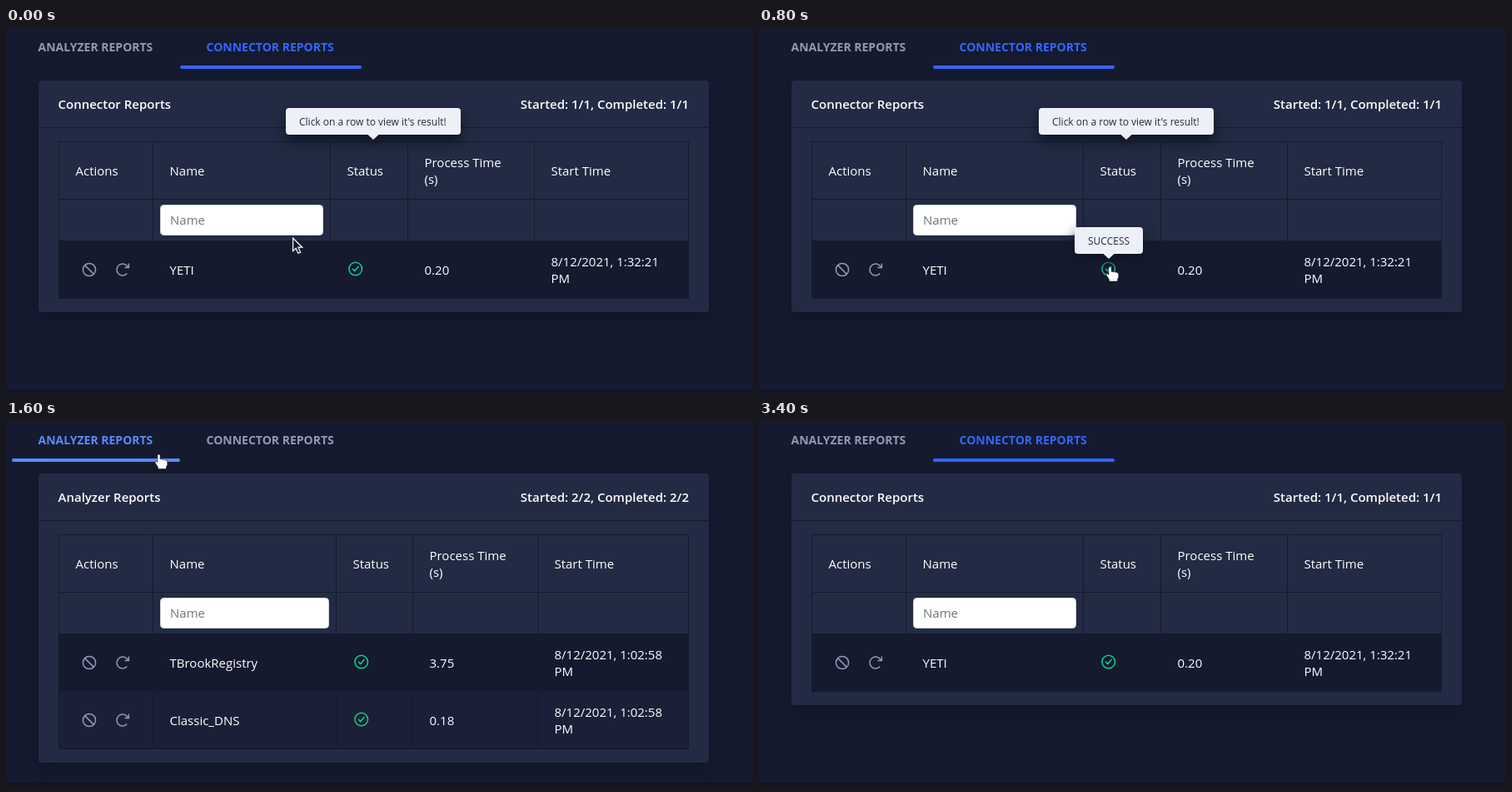
An HTML page for the animation above (3.6 s loop, 897 px wide and 438 px high).

```html
<!DOCTYPE html>
<html lang="en">
<head>
<meta charset="utf-8">
<title>Reports</title>
<style>
html, body { margin: 0; width: 100%; height: 100%; overflow: hidden; background: #151a2f; }
svg { display: block; width: 897px; height: 438px; }
text { font: 15px "Open Sans", "Noto Sans", sans-serif; fill: #fff; }
.title { font-weight: 600; }
.tab text { font-size: 14px; font-weight: 700; fill: currentColor; }
.tab rect { fill: currentColor; }
.card, .tip { filter: drop-shadow(0 8px 8px #101426); }
.card { fill: #222b43; }
.tip { fill: #edf1f7; }
.tip text { font-size: 12px; fill: #222b45; }
.hint { fill: #6c757d; }
.grid { stroke: #151a2f; fill: none; shape-rendering: crispEdges; }
.icon { stroke: #8f9bb3; stroke-width: 1.5; fill: none; }
.done { stroke: #10cc8c; stroke-width: 1.6; fill: none; stroke-linecap: round; stroke-linejoin: round; }
</style>
</head>
<body>
<svg viewBox="0 0 897 438">
  <defs>
    <g id="ban" class="icon"><circle r="7.6"/><path d="M-5.4-5.4 5.4 5.4"/></g>
    <g id="redo" class="icon">
      <path d="M5.3 4.6A7 7 0 1 1 5.6-4.2L7-2.5M7.4-7.5V-2.5H2.4"/>
    </g>
    <g id="done" class="done"><circle r="7.8"/><path d="M-3.2.2-.9 2.6 3.3-2.6"/></g>
  </defs>
  <rect y="434" width="897" height="4" fill="#101426"/>
  <g class="tab" id="tabA"><text x="38.5" y="28">ANALYZER REPORTS</text><rect x="7" y="45" width="202" height="4" rx="2"/></g>
  <g class="tab" id="tabC"><text x="240.5" y="28">CONNECTOR REPORTS</text><rect x="209" y="45" width="218" height="4" rx="2"/></g>
  <g id="viewA"></g>
  <g id="viewC"></g>
  <g class="tip" id="rowTip">
    <rect x="336" y="96" width="210" height="32" rx="4"/><path d="M434 127.5h14l-7 6.5z"/>
    <text x="352" y="117">Click on a row to view it's result!</text>
  </g>
  <g class="tip" id="statusTip">
    <rect x="379" y="239" width="82" height="32" rx="4"/><path d="M413 270.5h14l-7 6.5z"/>
    <text x="395" y="260">SUCCESS</text>
  </g>
  <g id="cursor">
    <path id="arrow" d="M.6.6V16.2L4.2 12.8 6.8 18.8 9.6 17.6 7 11.7H11.8Z" fill="#151a2f" stroke="#fff" stroke-width="1.2"/>
    <path id="hand" d="M-1.6 1.8Q0-1 1.6 1.8V6.2L8 7.2Q10.3 7.8 10.3 10V13L9 15.5V18H-1V16L-4.4 10.6Q-5 8.6-3.4 8.6L-1.6 10.2Z" fill="#fff" stroke="#151a2f" stroke-width=".6"/>
  </g>
</svg>
<script>
const LOOP = 3600, STEP = 100;
const $ = id => document.getElementById(id);
const text = (x, y, s, attrs = '') => `<text x="${x}" y="${y}" ${attrs}>${s}</text>`;
const use = (id, x, y) => `<use href="#${id}" x="${x}" y="${y}"/>`;

function table(title, count, cols, rows) {
  const bottom = 255 + 69 * rows.length;
  const [, name, status, process, start] = cols;
  const at = i => cols[i] + 20.5;
  let out = `<rect class="card" x="39" y="63" width="805" height="${bottom + 17 - 63}" rx="4"/>`
    + text(62.5, 97, title, 'class="title"')
    + text(820, 97, `Started: ${count}, Completed: ${count}`, 'class="title" text-anchor="end"');

  rows.forEach((row, i) => {
    out += `<rect x="63" y="${255 + 69 * i}" width="757" height="69" fill="${i % 2 ? '#1b1f37' : '#151a2f'}"/>`;
  });
  const across = [136, 205, 255, bottom].map(y => `M63 ${y + .5}H820`).join('');
  const down = [...cols, 819].map(x => `M${x + .5} 136V${bottom + 1}`).join('');
  out += `<path class="grid" d="M39 119.5H844${across}${down}"/>`;

  out += text(at(0), 177, 'Actions') + text(at(1), 177, 'Name') + text(at(2), 177, 'Status')
    + text(at(3), 167, 'Process Time') + text(at(3), 187, '(s)') + text(at(4), 177, 'Start Time')
    + `<rect x="185.5" y="212.5" width="${status - name - 18}" height="36" rx="4" fill="#fff" stroke="#ced4da"/>`
    + text(197, 236, 'Name', 'class="hint"');

  rows.forEach(([label, seconds, time], i) => {
    const y = 290 + 69 * i;
    out += use('ban', 100, y) + use('redo', 140, y) + use('done', status + 30.7, y - 1)
      + text(at(1), y + 6, label) + text(at(3), y + 6, seconds)
      + text(at(4), y - 4, `8/12/2021, ${time}`) + text(at(4), y + 16, 'PM');
  });
  return out;
}

$('viewA').innerHTML = table('Analyzer Reports', '2/2', [63, 176, 396, 488, 638],
  [['TBrookRegistry', '3.75', '1:02:58'], ['Classic_DNS', '0.18', '1:02:58']]);
$('viewC').innerHTML = table('Connector Reports', '1/1', [63, 176, 389, 482, 634],
  [['YETI', '0.20', '1:32:21']]);

// Each key is [time, ...values]
const path = [
  [0, 344, 251.5], [200, 349.5, 268], [400, 375, 298], [500, 375, 298], [700, 415, 288],
  [800, 421.5, 286], [1000, 421.5, 286], [1200, 183.5, 39.5], [1600, 183.5, 39.5],
  [1700, 205, 36], [1900, 298, 21], [2000, 311, 18.5], [3000, 311, 18.5], [3200, 240.5, 28.5]
];
const rowFade = [[0, 1], [100, .4], [200, .24], [300, .9], [400, 1], [1100, 1], [1200, .6], [1300, 0]];
const statusFade = [[600, 0], [700, .4], [800, 1], [1000, 1], [1100, .4], [1200, 0]];

function sample(keys, t) {
  const next = keys.findIndex(k => k[0] > t);
  if (next < 0) return keys[keys.length - 1].slice(1);
  if (next === 0) return keys[0].slice(1);
  const a = keys[next - 1], b = keys[next];
  const p = (t - a[0]) / (b[0] - a[0]);
  return a.slice(1).map((v, i) => v + (b[i + 1] - v) * p);
}

const show = (id, on) => { $(id).style.display = on ? '' : 'none'; };

function paintTab(id, active, hover) {
  $(id).style.color = hover ? '#598bff' : active ? '#3366ff' : '#8f9bb3';
  $(id).lastElementChild.style.display = active || hover ? '' : 'none';
}

function draw(t) {
  const analyzer = t >= 1500 && t < 2900;
  show('viewA', analyzer);
  show('viewC', !analyzer);
  paintTab('tabA', analyzer, t >= 1200 && t < 1800);
  paintTab('tabC', !analyzer, t >= 1800 && t < 3200);

  $('rowTip').style.opacity = sample(rowFade, t)[0];
  $('statusTip').style.opacity = sample(statusFade, t)[0];

  const arrow = t < 100 || t === 1100 || t >= 3200;
  show('arrow', arrow);
  show('hand', !arrow);
  show('cursor', t < 3400);
  $('cursor').setAttribute('transform', `translate(${sample(path, t)})`);
}

const begin = performance.now();
function tick() {
  const t = (performance.now() - begin) % LOOP;
  draw(Math.floor(t / STEP) * STEP);
  requestAnimationFrame(tick);
}
tick();
</script>
</body>
</html>
```
